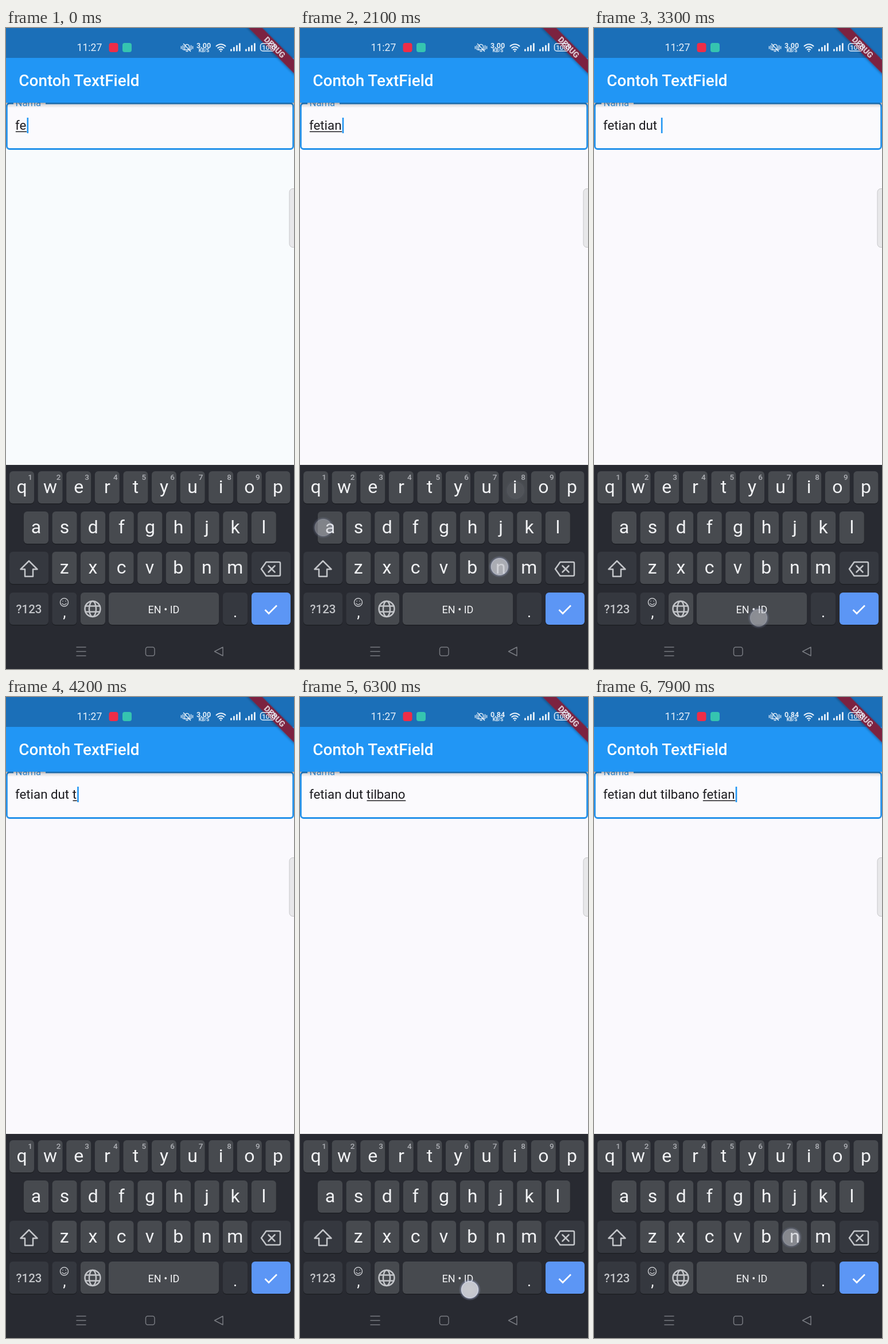
Write an HTML page that moves like this. It is 502 by 1115 pixels and loops after 8 s.

```html
<!DOCTYPE html>
<html lang="id">
<head>
<meta charset="utf-8">
<title>Contoh TextField</title>
<style>
  html, body { margin: 0; width: 502px; height: 1115px; overflow: hidden; background: #faf9fd; }
  svg { display: block; }
  text { font-family: Roboto, sans-serif; white-space: pre; }
  .mid { text-anchor: middle; }
  .line { fill: none; stroke-linecap: round; stroke-linejoin: round; }
</style>
</head>
<body>
<svg id="stage" width="502" height="1115" viewBox="0 0 502 1115">
  <defs>
    <linearGradient id="shade" x2="0" y2="1">
      <stop offset="0" stop-color="#000" stop-opacity=".34"/>
      <stop offset=".4" stop-color="#000" stop-opacity=".12"/>
      <stop offset="1" stop-color="#000" stop-opacity="0"/>
    </linearGradient>
    <radialGradient id="glow">
      <stop offset="0" stop-color="#c9cacf"/>
      <stop offset=".68" stop-color="#c4c6ce"/>
      <stop offset=".77" stop-color="#dfe3f2" stop-opacity=".9"/>
      <stop offset=".82" stop-color="#98a0c0" stop-opacity=".5"/>
      <stop offset="1" stop-color="#8f97bb" stop-opacity="0"/>
    </radialGradient>
    <filter id="soft" x="-30%" y="-30%" width="160%" height="160%">
      <feDropShadow dx="0" dy="1" stdDeviation="2" flood-opacity=".4"/>
    </filter>
  </defs>

  <rect id="page" width="502" height="762" fill="#faf9fd"/>

  <!-- text field -->
  <rect x="1.4" y="131" width="499.2" height="79.5" rx="5" fill="#fbfafd" stroke="#2592ea" stroke-width="2.8"/>
  <rect x="13" y="128" width="56" height="6" fill="#fbfafd"/>
  <text x="16.5" y="136" font-size="16.7" fill="#3a93dc">Nama</text>
  <text id="value" x="16" y="177" font-size="22.3" fill="#1d1c20"></text>
  <rect id="under" y="179.6" height="1.5" fill="#1d1c20"/>
  <rect id="caret" y="156" width="2.6" height="27" fill="#2196f3"/>

  <!-- app bar -->
  <rect y="130" width="502" height="9" fill="url(#shade)"/>
  <rect width="502" height="130" fill="#2196f5"/>
  <rect width="502" height="52" fill="#1b6fb8"/>
  <text x="22.3" y="101" font-size="27.9" font-weight="500" fill="#fff">Contoh TextField</text>
  <g transform="translate(468.5 33.5) rotate(45)">
    <rect x="-70" y="-8.4" width="140" height="16.8" fill="#7b2340" filter="url(#soft)"/>
    <text class="mid" y="5.1" font-size="14.2" font-weight="900" fill="#d9c3cd">DEBUG</text>
  </g>

  <!-- status bar -->
  <g fill="#e6f0f9">
    <text x="123.5" y="40" font-size="17.6">11:27</text>
    <rect x="179.5" y="26" width="16" height="16" rx="4" fill="#ee2d47"/>
    <rect x="203" y="26" width="16" height="16" rx="4" fill="#35c4b0"/>
    <text id="speed" class="mid" x="344.5" y="34.5" font-size="12.5" font-weight="700"></text>
    <text class="mid" x="345" y="42" font-size="8.2" font-weight="700">KB/S</text>
    <text class="mid" x="456" y="37.8" font-size="11.5" font-weight="500">100</text>
  </g>
  <g class="line" stroke="#e6f0f9" stroke-width="1.5">
    <path d="M305.5 32v4M308.500 30.500v7M325.500 32v4M322.500 30.500v7M310 38h11M311.500 38v-5a4 4.500 0 0 1 8 0v5M314 40.500h3M309.500 27.500l12 13"/>
    <path d="M366.500 31.500a11.500 11.500 0 0 1 16 0M369.300 34.800a7.600 7.600 0 0 1 10.400 0M372 37.800a3.600 3.600 0 0 1 5 0" stroke-width="2"/>
    <path d="M374.500 40.300v.1" stroke-width="2.400"/>
    <rect x="443.500" y="27" width="25" height="13" rx="4"/>
    <path d="M471 32v3"/>
  </g>
  <g id="bars" fill="#e6f0f9"></g>

  <rect x="494" y="279.500" width="16" height="102" rx="6" fill="#e8e8ea" stroke="#c6c6c9"/>

  <!-- keyboard -->
  <rect y="760" width="502" height="355" fill="#282a31"/>
  <g id="keys"></g>
  <g class="line" stroke="#c3c5c9" stroke-width="2.500">
    <path d="M40 927L54.500 941.500H47V954H33V941.500H25.500Z"/>
    <path d="M453.500 929H476a2 2 0 0 1 2 2v20a2 2 0 0 1-2 2H453.500L445 941Z M457.500 935.500l11 11M468.500 935.500l-11 11"/>
    <circle cx="151" cy="1010.500" r="13.500"/>
    <ellipse cx="151" cy="1010.500" rx="6" ry="13.500"/>
    <path d="M138.500 1005.500h25M138.500 1015.500h25"/>
    <path d="M451.500 1012l6.500 6.500 14-14" stroke="#fff" stroke-width="2.700" stroke-linecap="butt" stroke-linejoin="miter"/>
    <g stroke-width="1.500">
      <circle cx="101.500" cy="999" r="7"/>
      <path d="M98 1001a4 4 0 0 0 7 0M99 996.700v.2M104 996.700v.2"/>
    </g>
    <g stroke="#777a80" stroke-width="1.500">
      <path d="M123 1077h16M123 1084.500h16M123 1092h16M378 1077v15l-14.500-7.500Z"/>
      <rect x="243.500" y="1077" width="15.500" height="15" rx="3.500"/>
    </g>
  </g>
  <g id="popups"></g>
  <g id="touches"></g>
</svg>

<script>
const $ = id => document.getElementById(id);

function add(parent, tag, attrs, label) {
  const node = document.createElementNS("http://www.w3.org/2000/svg", tag);
  for (const name in attrs) node.setAttribute(name, attrs[name]);
  if (label) node.textContent = label;
  parent.append(node);
  return node;
}

const label = (parent, text, x, y, size, fill = "#f1f2f4", weight = 400) =>
  add(parent, "text", { class: "mid", x, y, "font-size": size, fill, "font-weight": weight }, text);

// Signal strength
for (const left of [391, 417])
  for (let i = 0; i < 4; i++) {
    const h = 4 + i * 3.4;
    add($("bars"), "rect", { x: left + i * 5, y: 40.5 - h, width: 2.8, height: h, rx: .8 });
  }

// Keyboard
const PITCH = 49.6, KEY_W = 43, KEY_H = 56;
const PLAIN = "#474a4f", DIM = "#35383f";
const keys = { " ": { x: 179, y: 982, w: 192 } };

function keyCap(x, y, w, fill) {
  add($("keys"), "rect", { x, y: y + 1.5, width: w, height: KEY_H, rx: 6, fill: "#1d1f24" });
  add($("keys"), "rect", { x, y, width: w, height: KEY_H, rx: 6, fill });
}

[["qwertyuiop", 6, 771], ["asdfghjkl", 31, 841], ["zxcvbnm", 80.3, 911]].forEach(([row, left, y], r) => {
  [...row].forEach((ch, i) => {
    const x = left + i * PITCH;
    keys[ch] = { x, y, w: KEY_W };
    keyCap(x, y, KEY_W, PLAIN);
    label($("keys"), ch, x + KEY_W / 2, y + 37.500, 32);
    if (r === 0) label($("keys"), (i + 1) % 10, x + 36, y + 14.5, 13.5, "#aeb0b5", 500);
  });
});

[[6, 911, 68, DIM], [428, 911, 68, DIM], [6, 982, 68, DIM], [80.3, 982, 43, DIM], [130, 982, 43, PLAIN],
 [179, 982, 192, PLAIN], [378, 982, 43, DIM], [428, 982, 68, "#5c96f5"]].forEach(k => keyCap(...k));

label($("keys"), "?123", 40, 1018, 20.5, "#c3c5c9", 500);
label($("keys"), ",", 102, 1025, 27);
label($("keys"), "EN • ID", 275, 1017.5, 18);
label($("keys"), ".", 399.5, 1025, 27);

// Taps: character, finger down, finger up, offset from the key centre
const LOOP = 8000, FADE = 240;
const START = "fe", START_TIME = -200;
const taps = [
  ["t", 600, 730, 2, 6],
  ["i", 1600, 1880, 1, 5],
  ["a", 1870, 1970, -12, 0],
  ["n", 1960, 2050, -2, -2],
  [" ", 2300, 2420, 10, 18],
  ["d", 2520, 2640, -3, 3],
  ["u", 2740, 2880, -1, 26],
  ["t", 2940, 3040, 2, 8],
  [" ", 3110, 3190, 12, 16],
  ["t", 3860, 3960, 0, 8],
  ["i", 4600, 4720, -2, 8],
  ["l", 4850, 4950, -3, 4],
  ["b", 5340, 5440, 2, 2],
  ["a", 5480, 5560, -8, 2],
  ["n", 5600, 5670, -2, 2],
  ["o", 5690, 5760, -3, 8],
  [" ", 6270, 6360, 21, 21],
  ["f", 6790, 6880, 2, 5],
  ["e", 6930, 7030, 2, 8],
  ["t", 7100, 7190, 1, 7],
  ["i", 7270, 7360, 0, 7],
  ["a", 7410, 7500, -10, 2],
  ["n", 7660, 7780, -6, 1]
].map(([ch, down, up, dx, dy]) => {
  const { x, y, w } = keys[ch];
  const dot = add($("touches"), "circle", { cx: x + w / 2 + dx, cy: y + 28 + dy, r: 19, fill: "url(#glow)" });
  return { ch, down, up, dot, popup: ch === " " ? null : makePopup(ch, x, y) };
});

function makePopup(ch, x, y) {
  const g = add($("popups"), "g", {});
  const mid = x + KEY_W / 2;
  add(g, "rect", { x: mid - 26.5, y: y - 99, width: 53, height: 154, rx: 6, fill: "#33373f", filter: "url(#soft)" });
  label(g, ch, mid, y - 46, 38);
  if ("qwertyuiopasdlzcn".includes(ch))
    for (let i = 0; i < 3; i++) add(g, "circle", { cx: mid + 9.5 + i * 4.5, cy: y - 30, r: 1.5, fill: "#e8e9ec" });
  return g;
}

const ruler = document.createElement("canvas").getContext("2d");
ruler.font = "22.3px Roboto, sans-serif";
const widthOf = text => ruler.measureText(text).width;

function draw(t) {
  let text = START, last = START_TIME;
  for (const { ch, down, up, dot, popup } of taps) {
    if (t >= up) { text += ch; last = up; }
    const alpha = t < down ? 0 : t < up ? 1 : Math.max(0, 1 - (t - up) / FADE);
    dot.setAttribute("opacity", alpha);
    if (popup) popup.style.display = t >= down && t < up + 30 ? "" : "none";
  }

  const from = widthOf(text.slice(0, text.lastIndexOf(" ") + 1));
  const end = widthOf(text);
  $("value").textContent = text;
  $("under").setAttribute("x", 16.8 + from);
  $("under").setAttribute("width", Math.max(0, end - from));
  $("caret").setAttribute("x", 17.2 + end);
  $("caret").style.display = (t - last) % 1000 < 500 ? "" : "none";

  $("speed").textContent = t < 5400 ? "3.00" : "0.84";
  $("page").setAttribute("fill", t < 100 ? "#f8fbfd" : "#faf9fd");
}

const begin = performance.now();
function tick() {
  draw((performance.now() - begin) % LOOP);
  requestAnimationFrame(tick);
}
tick();
</script>
</body>
</html>
```
